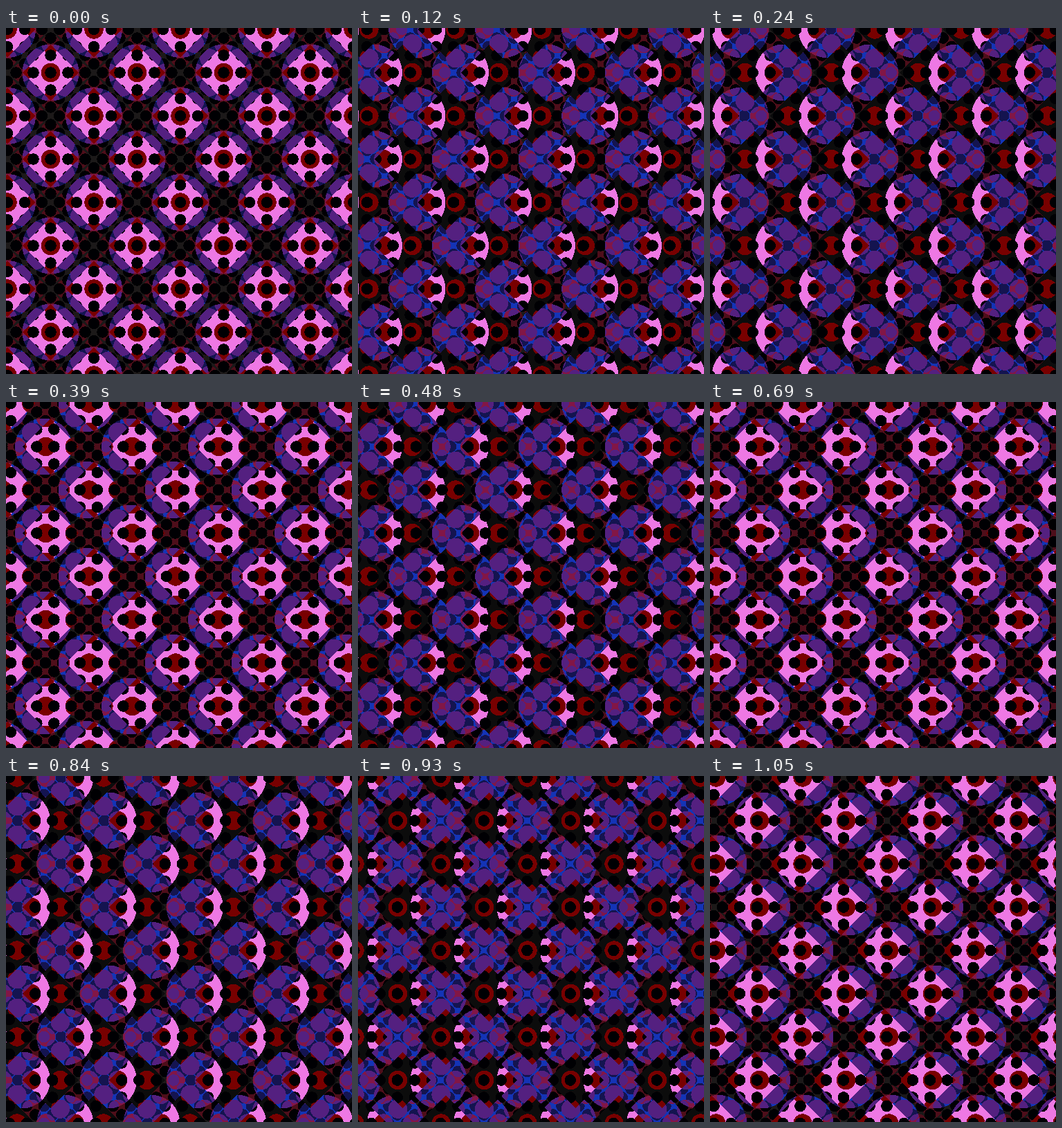
Write an HTML page with a canvas that moves like this. It is 500 by 500 pixels and loops after 1080 ms.

```html
<!DOCTYPE html>
<html lang="en">
<head>
<meta charset="utf-8">
<title>Sliding disc lattice</title>
<style>
html, body { margin: 0; width: 100%; height: 100%; overflow: hidden; background: #0c0c0c; }
canvas { display: block; }
</style>
</head>
<body>
<canvas id="stage" width="500" height="500"></canvas>
<script>
const STEPS = 36, STEP_MS = 30, TILE = 125, HALF = TILE / 2, CENTRE = 64.5;
const CORE = 41; // reach of a diamond before its neighbour shows through
const ctx = document.getElementById('stage').getContext('2d');
const tile = document.createElement('canvas');
tile.width = tile.height = TILE;
const tileCtx = tile.getContext('2d');
const image = tileCtx.createImageData(TILE, TILE);

const PINK = [238, 120, 228], RED = [120, 0, 0], BLACK = [0, 0, 3], DARK = [12, 12, 12];
const BLUE = [20, 52, 182], NAVY = [20, 20, 80], PURPLE = [84, 32, 128];
const CRIMSON = [130, 22, 70], MAROON = [78, 14, 26], BROWN = [28, 25, 25];

const wrap = (value, period) => value - period * Math.round(value / period);

// Is the point inside a disc of the square grid with n discs per tile?
function inDisc(x, y, n) {
  const gap = TILE / n;
  return Math.hypot(wrap(x, gap), wrap(y, gap)) < 0.328 * gap;
}

// The three disc grids slide left by 3, 2 and 1 tiles per loop.
function sample(x, y, step) {
  const drift = laps => x + laps * TILE * step / STEPS;
  return {
    pink: inDisc(drift(3), y, 1),
    red: inDisc(drift(2), y, 3),
    black: inDisc(drift(1), y, 5)
  };
}

function plain(s) {
  return s.black ? BLACK : s.red ? RED : s.pink ? PINK : DARK;
}

function blend(a, b) {
  const pink = a.pink || b.pink;
  if (a.black || b.black) {
    if (!pink || a.black && b.black) return BLACK;
    return a.red || b.red ? PURPLE : NAVY;
  }
  if (a.red || b.red) {
    if (!pink) return MAROON;
    return a.red && a.pink || b.red && b.pink ? CRIMSON : PURPLE;
  }
  return pink ? BLUE : BROWN;
}

// Two sets of fixed diamonds, half a tile apart, overlap along their edges.
function colourAt(x, y, step) {
  const reach = Math.abs(wrap(x, TILE)) + Math.abs(wrap(y, TILE));
  if (reach < CORE) return plain(sample(x, y, step));
  const other = sample(x + HALF, y + HALF, step);
  if (reach > TILE - CORE) return plain(other);
  return blend(sample(x, y, step), other);
}

function draw(step) {
  let p = 0;
  for (let y = 0; y < TILE; y++) {
    for (let x = 0; x < TILE; x++) {
      const [r, g, b] = colourAt(x + 0.5 - CENTRE, y + 0.5 - CENTRE, step);
      image.data[p++] = r;
      image.data[p++] = g;
      image.data[p++] = b;
      image.data[p++] = 255;
    }
  }
  tileCtx.putImageData(image, 0, 0);
  ctx.fillStyle = ctx.createPattern(tile, 'repeat');
  ctx.fillRect(0, 0, 500, 500);
}

const start = performance.now();
let shown = -1;
function tick() {
  const step = Math.floor((performance.now() - start) / STEP_MS) % STEPS;
  if (step !== shown) draw(shown = step);
  requestAnimationFrame(tick);
}
tick();
</script>
</body>
</html>
```
